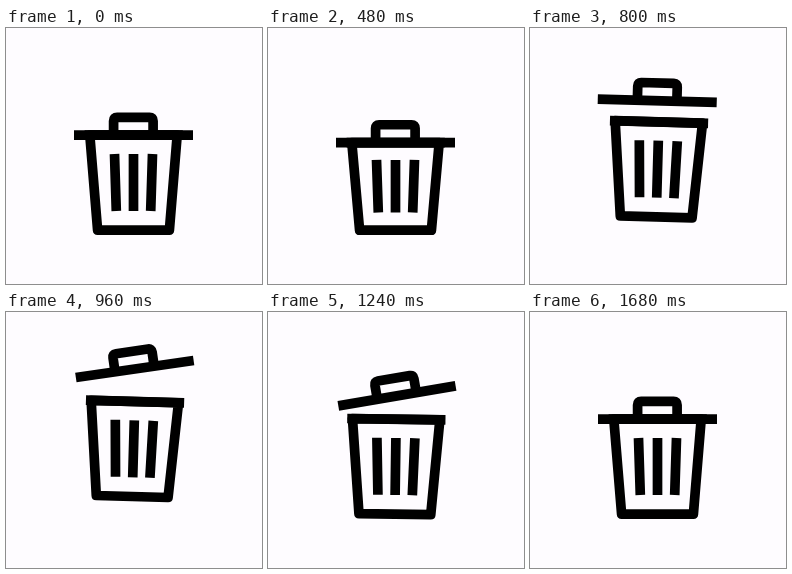
These frames come from a looping animation (256x256 px, 1.72 s). An HTML page:

```html
<!DOCTYPE html>
<html lang="en">
<head>
<meta charset="utf-8">
<title>Trash can</title>
<style>
  html, body { margin: 0; height: 100%; overflow: hidden; background: #fefcff; }
  svg { display: block; width: 100vw; height: 100vh; }
  path { fill: none; stroke: #000; stroke-width: 9.7; }
</style>
</head>
<body>
<svg viewBox="0 0 256 256">
  <g id="can">
    <path id="shell" stroke-linejoin="round"/>
    <path id="rim"/>
    <path id="bars"/>
  </g>
  <g id="lid">
    <path d="M68 107.2H187"/>
    <path d="M107.6 105V92.9Q107.6 89.4 111.1 89.4H143.6Q147.1 89.4 147.1 92.9V105"/>
  </g>
</svg>
<script>
const LOOP = 1720, STEP = 40;
const CENTER = 127.5, TOP = 107.2, BOTTOM = 202.2;
const $ = id => document.getElementById(id);

const progress = (t, from, to) => Math.min(1, Math.max(0, (t - from) / (to - from)));
const easeInOut = (t, from, to) => {
  const s = progress(t, from, to);
  return s * s * (3 - 2 * s);
};
const easeOut = (t, from, to) => 1 - (1 - progress(t, from, to)) ** 2;

function draw(t) {
  // The lid presses down, is flung up, then falls back while it swings.
  const press = 14.7, launch = 65.5;
  const lidY = press * easeInOut(t, 320, 640)
    - launch * easeOut(t, 640, 960)
    + (launch - press) * easeInOut(t, 920, 1525);
  const swing = 16.2 * (easeInOut(t, 800, 1080) - easeInOut(t, 1080, 1480));

  // The can is squeezed by the lid and hops after it.
  const squash = Math.max(0, lidY);
  const hop = -18.5 * Math.sin(Math.PI * progress(t, 680, 1150));
  const lean = 1.6 * (easeInOut(t, 680, 800) - easeInOut(t, 1120, 1360));

  const drop = y => y + squash * (BOTTOM - y) / (BOTTOM - TOP);
  const top = drop(TOP);
  $('shell').setAttribute('d', `M83.8 ${top}L91.6 ${BOTTOM}H163.4L171.2 ${top}Z`);
  $('rim').setAttribute('d', `M78.6 ${top}H176.8`);
  $('bars').setAttribute('d', [-1, 0, 1]
    .map(i => `M${CENTER + 19 * i} ${drop(126)}L${CENTER + 17.2 * i} ${drop(183)}`).join(''));

  $('can').setAttribute('transform', `translate(0 ${hop}) rotate(${lean} ${CENTER} 155)`);
  $('lid').setAttribute('transform', `translate(0 ${lidY}) rotate(${lean - swing} ${CENTER} 98.5)`);
}

function tick() {
  const t = performance.now() % LOOP;
  draw(Math.floor(t / STEP) * STEP);
  requestAnimationFrame(tick);
}
tick();
</script>
</body>
</html>
```
